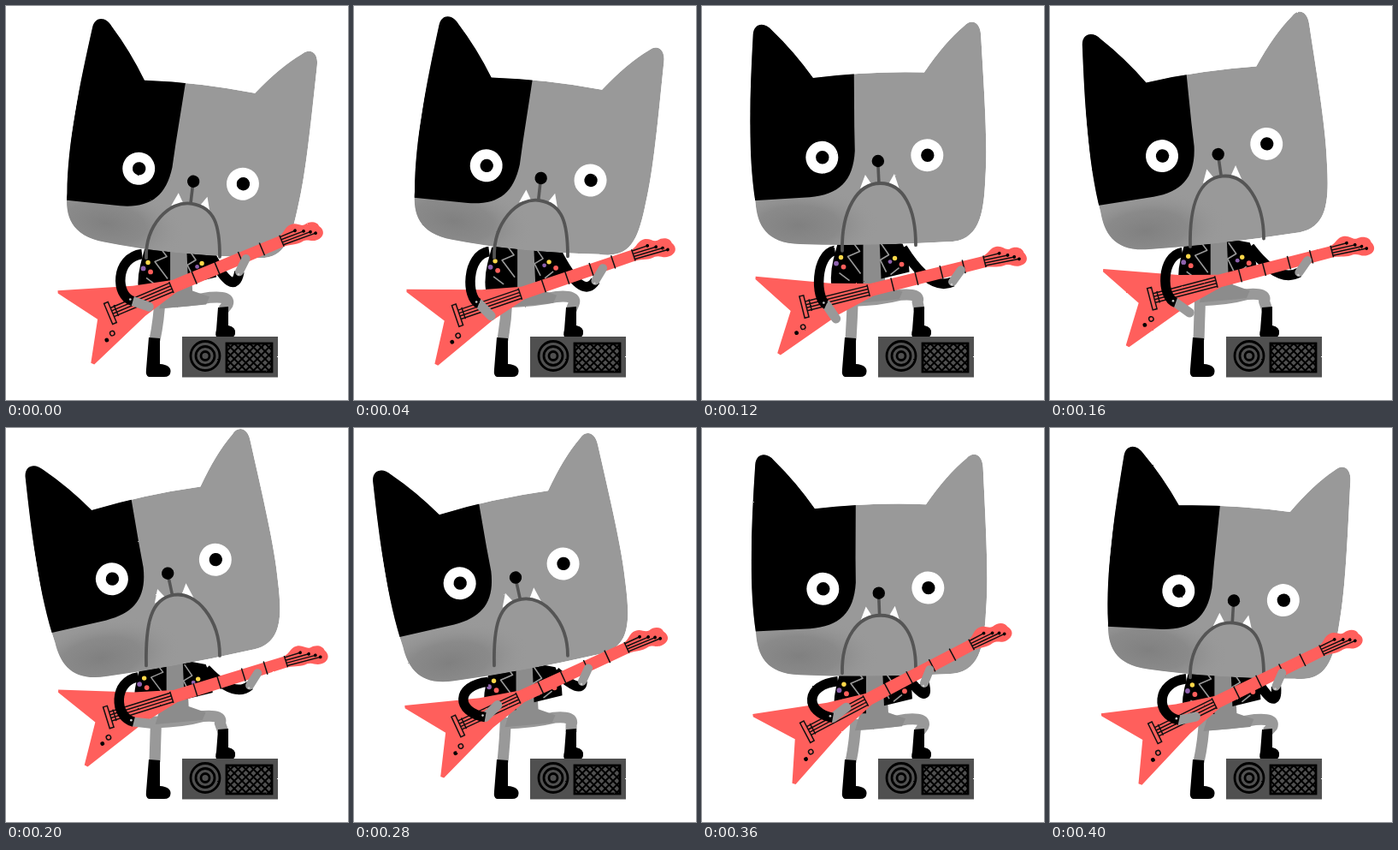
Animation, 400 px wide and 460 px high, one loop 440 ms. Source, as an HTML page:

```html
<!DOCTYPE html>
<html lang="en">
<head>
<meta charset="utf-8">
<title>Guitar cat</title>
<style>
html, body { margin: 0; width: 100%; height: 100%; overflow: hidden; background: #fff; }
svg { display: block; width: 100vw; height: 100vh; }
.line { fill: none; stroke: #000; }
.fur { fill: none; stroke: #999; stroke-linejoin: round; }
.round { stroke-linecap: round; }
.seam { fill: none; stroke: #999; stroke-width: 1.6; stroke-linejoin: round; }
.mark { fill: none; stroke: #111; stroke-width: 1.5; }
</style>
</head>
<body>
<svg viewBox="0 0 400 460">
  <defs>
    <filter id="rough" filterUnits="userSpaceOnUse" x="0" y="0" width="400" height="460" color-interpolation-filters="sRGB">
      <feTurbulence type="fractalNoise" baseFrequency="0.35" numOctaves="2" seed="4"/>
      <feDisplacementMap in="SourceGraphic" scale="1.4" xChannelSelector="R" yChannelSelector="G"/>
    </filter>
    <radialGradient id="shade">
      <stop offset="0" stop-color="#808080"/>
      <stop offset=".5" stop-color="#868686" stop-opacity=".8"/>
      <stop offset="1" stop-color="#999" stop-opacity="0"/>
    </radialGradient>
    <pattern id="mesh" x="258" y="394" width="9" height="9" patternUnits="userSpaceOnUse">
      <path d="M-1 -1L10 10M10 -1L-1 10" class="line" stroke-width="2"/>
    </pattern>
    <clipPath id="skull"><path id="skullPath"/></clipPath>
  </defs>
  <g filter="url(#rough)">
    <path id="legL" class="fur" stroke-width="13"/>
    <path d="M167 387L180 388L180 418Q193 419 192.5 427Q192 433 185 433L167 433Q163 432 164 424Z"/>
    <path id="legR" class="fur" stroke-width="13"/>
    <path d="M248 352L260 351L260 373Q269 375 268 382Q268 387 262 387L247 387Q244 385 246 378Z"/>
    <rect x="206" y="386" width="112" height="47.5" fill="#505050"/>
    <g class="line" stroke-width="2.8">
      <circle cx="233" cy="408.5" r="17"/><circle cx="233" cy="408.5" r="11"/><circle cx="233" cy="408.5" r="5"/>
      <rect x="258" y="394" width="53" height="33" style="fill:url(#mesh)"/>
    </g>
    <g id="torso">
      <path d="M186 270H213L216 328L236 335L232 344L177 349L183 328Z" fill="#8c8c8c"/>
      <path d="M160 279L190 274V329H153Q151 315 155 298Z"/>
      <path d="M209 274L236 279Q244 296 244 312L211 320Z"/>
      <path class="seam" d="M177 276L186 288L172 294L187 314M162 313L174 322M211 279L220 292L210 298L217 312M222 315L232 307"/>
      <g fill="#ffd84a"><circle cx="164" cy="295" r="2.7"/><circle cx="227" cy="296" r="2.7"/></g>
      <g fill="#8e62ae"><circle cx="158.5" cy="302" r="2.9"/><circle cx="221.5" cy="300" r="2.4"/></g>
      <g fill="#ff5f5c"><circle cx="167" cy="306" r="2.9"/><circle cx="235" cy="303" r="2.9"/></g>
    </g>
    <path id="sleeveR" class="line" stroke-width="11.5"/>
    <g id="head" clip-path="url(#skull)">
      <path id="fur" fill="#999"/>
      <ellipse cx="-82" cy="205" rx="95" ry="46" fill="url(#shade)"/>
      <g id="face">
        <path d="M-170 -270H-28L-27.500 -40L-27 -12C-29 24 -46 39 -80 42L-170 47Z"/>
        <g fill="#fff">
          <circle cx="-65.500" cy="-4.500" r="19"/><circle cx="57.500" cy="-6.500" r="19"/>
          <path d="M-15 16L-21 32L-7 28Z"/><path d="M19 15L12 27L25 33Z"/>
        </g>
        <circle cx="-65" cy="-4.500" r="7.700"/><circle cx="58" cy="-6.500" r="7.700"/>
        <path d="M0 4L1 26" fill="none" stroke="#555" stroke-width="3.600"/>
        <circle r="7.200"/>
      </g>
    </g>
    <path id="mouth" class="round" fill="none" stroke="#555" stroke-width="3.800"/>
    <g id="guitar">
      <g fill="#ff5f5c">
        <path d="M-48 -48L35 -19L80 -7.500V7.500L35 19L-42 48L-45 45L-18 1L-49 -45Z"/>
        <path d="M76 -7.500L216 -6.500C223 -8 226 -14 233 -13.500C241 -13 242 -7 248 -7C255 -9 263 -5 263 1C268 9 263 15 255 15C247 15 246 10 239 10C231 11.500 225 8 216 7L76 7.500Z"/>
      </g>
      <path class="mark" d="M105 -8V8M134 -8V8M164 -8V8M191 -8V8M216 -7V7"/>
      <path class="mark" d="M1 -5.500H76M1 -1.800H76M1 1.800H76M1 5.500H76M76 -7V7M6 -7V7"/>
      <path class="mark" d="M216 -5H235M216 -1.500L244 -.5M216 1.800L251 3.300M216 5L256 7"/>
      <rect class="mark" x="-4" y="-13" width="5" height="26"/>
      <circle cx="235" cy="-5" r="1.900"/><circle cx="244" cy="-.5" r="1.900"/>
      <circle cx="251" cy="3.300" r="1.900"/><circle cx="256" cy="7" r="1.900"/>
      <circle cx="-17.500" cy="27.500" r="2.400"/><circle class="mark" cx="-8.500" cy="22.700" r="2.700"/>
    </g>
    <path id="handR" class="fur round" stroke-width="10"/>
    <circle id="studR" r="1.300" fill="#ccc"/>
    <path id="handL" class="fur round" stroke-width="11"/>
    <path id="sleeveL" class="line" stroke-width="11.500"/>
    <circle id="studL" r="1.300" fill="#ccc"/>
  </g>
</svg>
<script>
const STEP = 40, STEPS = 11, RAD = Math.PI / 180;
const $ = id => document.getElementById(id);
const path = (id, d) => $(id).setAttribute('d', d);
const place = (id, x, y, turn = 0) => $(id).setAttribute('transform', `translate(${x} ${y}) rotate(${turn})`);

// Point given in a frame at (x, y) turned by some degrees, in stage units.
function turned(x, y, turn, px, py) {
  const c = Math.cos(turn * RAD), s = Math.sin(turn * RAD);
  return [x + px * c - py * s, y + px * s + py * c];
}

function skull(lift) {
  const y = 225 - lift;
  return `M-134 -18C-133 -32 -120 -33 -112 -23Q-86 2 -64 33Q0 25 66 27Q90 -8 113 -27
    C121 -36 132 -32 132.5 -16C136 50 140 110 137 150C135 193 130 ${y} 92 ${y}
    Q0 230 -80 227C-120 226 -130 204 -132 178C-141 120 -138 50 -134 -18Z`;
}

// The head leans from side to side; tilt, face and mouth follow the lean.
function drawHead(wave) {
  const lean = wave(39.8, 15) + wave(1.5, 0, 2);
  const x = 190.5 + lean, y = 57.6 + wave(6.5, -40) + wave(2, 20, 2);
  const tilt = 0.26 * lean - 2.2, turn = tilt + 1.1, faceY = 131.7 + 1.05 * tilt;
  const shape = skull(Math.max(0, tilt));
  path('skullPath', shape);
  path('fur', shape);
  place('head', x, y, turn);
  place('face', 11.5, faceY);

  const lip = px => turned(x, y, turn, px, faceY + 26);
  const lx = 164, ly = 285 + 0.23 * lean, rx = 250, ry = 278 + 0.37 * lean;
  const top = lip(14), rise = end => end - 0.6 * (end - top[1]);
  path('mouth', `M${lx} ${ly}C${lx - 1} ${rise(ly)} ${lip(-13)} ${top}C${lip(41)} ${rx} ${rise(ry)} ${rx} ${ry}`);
}

function drawBody(dx, dy) {
  place('torso', dx, dy);
  path('legL', `M${178 + dx} ${338 + dy / 2}Q${177 + dx} 365 174 390`);
  const kx = 251 + 2 * dx, ky = 338 + dy / 2;
  path('legR', `M${176 + dx} ${345 + dy / 3}Q${210 + dx} ${344 + dy / 3} ${kx - 16} ${ky}
    Q${kx + 8} ${ky - 2} ${kx + 4} ${ky + 8}L254 355`);
}

// The picking arm: one strum value moves shoulder, elbow, wrist and hand.
function drawPicking(strum, dx) {
  const sy = 291 - 6 * strum, ex = 125.5 + 7.5 * strum;
  const wx = 149.5 - 4.5 * strum, wy = 343 + 6 * strum;
  path('sleeveL', `M${157 + dx} ${sy}C${ex} ${sy + 4} ${ex} ${wy - 6} ${wx} ${wy}`);
  path('handL', `M${wx} ${wy}L${turned(wx, wy, 5 + 55 * strum, 20, 0)}`);
  place('studL', wx - 3, wy - 2);
}

// The fretting hand slides along the neck as the guitar tips.
function drawFretting(gx, gy, tilt, elbowY, dx, dy) {
  const fret = 185 + 2 * (tilt + 15);
  const [wx, wy] = turned(gx, gy, tilt, fret - 13, 14);
  path('sleeveR', `M${236 + dx} ${284 + dy}Q267 ${elbowY} ${wx} ${wy}`);
  path('handR', `M${wx} ${wy}L${turned(gx, gy, tilt, fret, 3)}`);
  place('studR', wx - 1, wy + 3);
}

function draw(n) {
  const wave = (size, lag, rate = 1) => size * Math.cos((360 * rate * n / STEPS - lag) * RAD);
  const dx = wave(2.4, -30), dy = 1 + wave(4, -30);
  const gx = 122.5 - wave(1.7, 120), gy = 350.5 + wave(10, 0) + wave(4, 130, 2), tilt = wave(7, 105) - 21;
  drawBody(dx, dy);
  drawHead(wave);
  place('guitar', gx, gy, tilt);
  drawPicking(wave(1, 75), dx);
  drawFretting(gx, gy, tilt, 328 + wave(17, 30), dx, dy);
}

let shown = -1;
function tick() {
  const n = Math.floor(performance.now() / STEP) % STEPS;
  if (n !== shown) draw(shown = n);
  requestAnimationFrame(tick);
}
tick();
</script>
</body>
</html>
```
